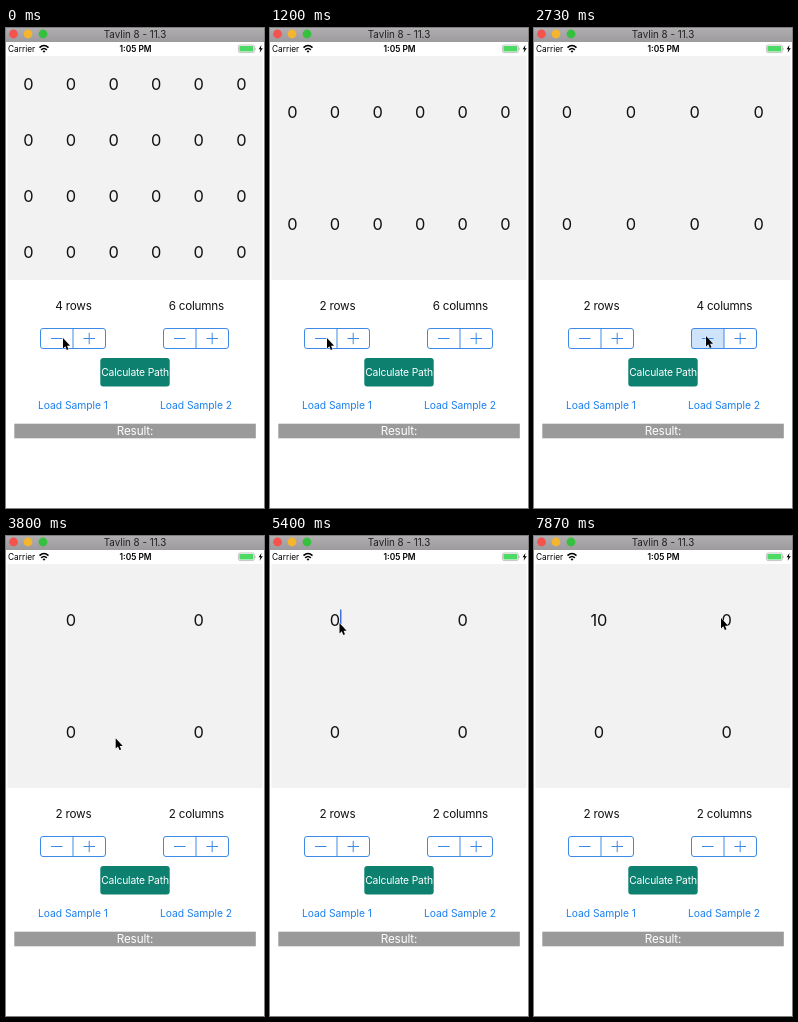
Recreate the animation shown at these times as an HTML page. Size 258 px wide and 480 px high, loop 8 s.

```html
<!DOCTYPE html>
<html lang="en">
<head>
<meta charset="utf-8">
<title>Path grid</title>
<style>
  html, body { margin: 0; width: 100%; height: 100%; overflow: hidden; background: #fff; }
  svg { display: block; width: 258px; height: 480px; font-family: Inter, Roboto, sans-serif; }
  text { text-anchor: middle; }
  .cell { font-size: 16.4px; fill: #111; }
  .label { font-size: 11.7px; letter-spacing: -.22px; fill: #111; }
  .link { font-size: 10.3px; letter-spacing: -.04px; fill: #1c80ee; }
  .stepper { fill: none; stroke: #3d8ae6; stroke-width: 1; }
</style>
</head>
<body>
<svg viewBox="0 0 258 480">
  <defs>
    <linearGradient id="bar" x2="0" y2="1">
      <stop stop-color="#b0aeb0"/><stop offset="1" stop-color="#9c9a9c"/>
    </linearGradient>
    <g id="stepper" class="stepper">
      <rect x=".5" y=".5" width="65" height="20" rx="2.5"/>
      <path d="M33 .5V20.5M11 10.5H22.5M43.5 10.5H55M49.2 4.8V16.2"/>
    </g>
  </defs>

  <rect width="258" height="14" fill="url(#bar)"/>
  <circle cx="7.5" cy="6" r="4.4" fill="#f4544d"/>
  <circle cx="22" cy="6" r="4.4" fill="#f5b52e"/>
  <circle cx="37" cy="6" r="4.4" fill="#35c13f"/>
  <text x="129" y="9.6" font-size="9.8" fill="#222">Tavlin 8 - 11.3</text>

  <text x="2" y="24" font-size="8.3" style="text-anchor:start">Carrier</text>
  <g fill="none" stroke="#000" stroke-width="1.6">
    <path d="M33.5 19.6Q38 15.4 42.5 19.6M35.2 21.8Q38 19.2 40.8 21.8"/>
    <path d="M38 24.8L36.6 23.2Q38 22 39.4 23.2Z" fill="#000" stroke="none"/>
  </g>
  <text x="129.5" y="24" font-size="8.4" font-weight="600">1:05 PM</text>
  <rect x="232.4" y="17" width="16" height="7.6" rx="1.8" fill="#fff" stroke="#aaa" stroke-width=".7"/>
  <rect x="233.4" y="18" width="14" height="5.6" rx="1" fill="#4cd964"/>
  <path d="M249.4 19.4Q250.8 20.8 249.4 22.2Z" fill="#aaa"/>
  <path d="M255.4 17L252.6 21.3H254.4L253.6 24.8L256.8 20.2H254.9Z"/>

  <rect x="1.5" y="28" width="255" height="224" fill="#f2f2f2"/>
  <g id="grid"></g>
  <rect id="caret" width="1.5" height="14.5" y="73.5" fill="#426fe0"/>

  <text id="rowLabel" class="label" x="67.5" y="282"></text>
  <text id="colLabel" class="label" x="190.3" y="282"></text>
  <rect id="press" y="301" width="32.5" height="20" fill="#cfe4fb"/>
  <use href="#stepper" x="34" y="300"/>
  <use href="#stepper" x="157" y="300"/>

  <rect x="94.3" y="330" width="69.4" height="28.5" rx="3" fill="#0d806f"/>
  <text x="129" y="348" font-size="10.3" letter-spacing="-.17" fill="#fff">Calculate Path</text>
  <text class="link" x="67" y="381">Load Sample 1</text>
  <text class="link" x="190" y="381">Load Sample 2</text>
  <rect x="8.3" y="395.7" width="241.5" height="14.6" fill="#9a9a9a"/>
  <text x="129" y="407.2" font-size="11.7" letter-spacing="-.1" fill="#fff">Result:</text>

  <path id="cursor" d="M0 0V10.4L2.3 8.3L3.8 11.9L5.5 11.2L4 7.7H7.1Z" stroke="#fff" stroke-width=".8" paint-order="stroke"/>
</svg>
<script>
const LOOP = 8000;
const $ = id => document.getElementById(id);
const grid = $('grid'), caret = $('caret'), press = $('press'), cursor = $('cursor');

// [time, value]: each value holds until the next time
const rowSteps = [[0, 4], [530, 3], [1200, 2]];
const colSteps = [[0, 6], [1930, 5], [2200, 4], [2870, 3], [3430, 2]];
const textSteps = [[0, '0'], [5730, '1'], [6070, '10']];
const caretOffset = { 0: 5, 1: 3.6, 10: 8.4 };

// [start, end, x of the pressed minus]
const presses = [[270, 530, 34.5], [1000, 1200, 34.5], [1800, 1930, 157.5],
  [2070, 2200, 157.5], [2730, 2870, 157.5], [3330, 3800, 157.5]];

// [time, x, y] of the pointer tip
const path = [[0, 57, 310], [1220, 57, 310], [1730, 172, 308], [3799, 172, 308],
  [3800, 110, 203], [3930, 68, 100], [4060, 68, 100], [4270, 69.5, 87],
  [6410, 69.5, 87], [6600, 146, 81], [6870, 187, 82], [LOOP, 187, 82]];

const valueAt = (steps, t) => steps.filter(s => s[0] <= t).pop()[1];
const clamp = v => Math.max(0, Math.min(1, v));
const colX = (i, cols) => 1.1 + 255.5 * (i + .5) / cols;

function pointerAt(t) {
  const i = path.findIndex(p => p[0] > t);
  const [t0, x0, y0] = path[i - 1], [t1, x1, y1] = path[i];
  const k = (t - t0) / (t1 - t0);
  return [x0 + (x1 - x0) * k, y0 + (y1 - y0) * k];
}

// Solid, then a slow fade out and a quick fade in
function blink(age) {
  const a = age % 870;
  return a < 540 ? 1 : a < 770 ? 1 - clamp((a - 540) / 190) : (a - 770) / 100;
}

let shown = '';
function drawGrid(rows, cols, first) {
  const key = [rows, cols, first].join();
  if (key === shown) return;
  shown = key;
  let cells = '';
  for (let r = 0; r < rows; r++)
    for (let c = 0; c < cols; c++)
      cells += `<text class="cell" x="${colX(c, cols)}" y="${34 + 224 * (r + .5) / rows}">${r + c ? 0 : first}</text>`;
  grid.innerHTML = cells;
  $('rowLabel').textContent = rows + ' rows';
  $('colLabel').textContent = cols + ' columns';
}

function draw(t) {
  const text = valueAt(textSteps, t);
  drawGrid(valueAt(rowSteps, t), valueAt(colSteps, t), text);

  const held = presses.find(([start, end]) => t >= start && t < end);
  press.setAttribute('opacity', held ? 1 : 0);
  if (held) press.setAttribute('x', held[2]);

  const second = t >= 7100;
  const since = [7130, 6070, 5730, 4530].find(s => t >= s);
  caret.setAttribute('x', second ? colX(1, 2) + 5 : colX(0, 2) + caretOffset[text]);
  caret.setAttribute('opacity', since ? blink(t - since) : 0);

  cursor.setAttribute('transform', `translate(${pointerAt(t)})`);
}

function frame() {
  draw(performance.now() % LOOP);
  requestAnimationFrame(frame);
}
frame();
</script>
</body>
</html>
```
